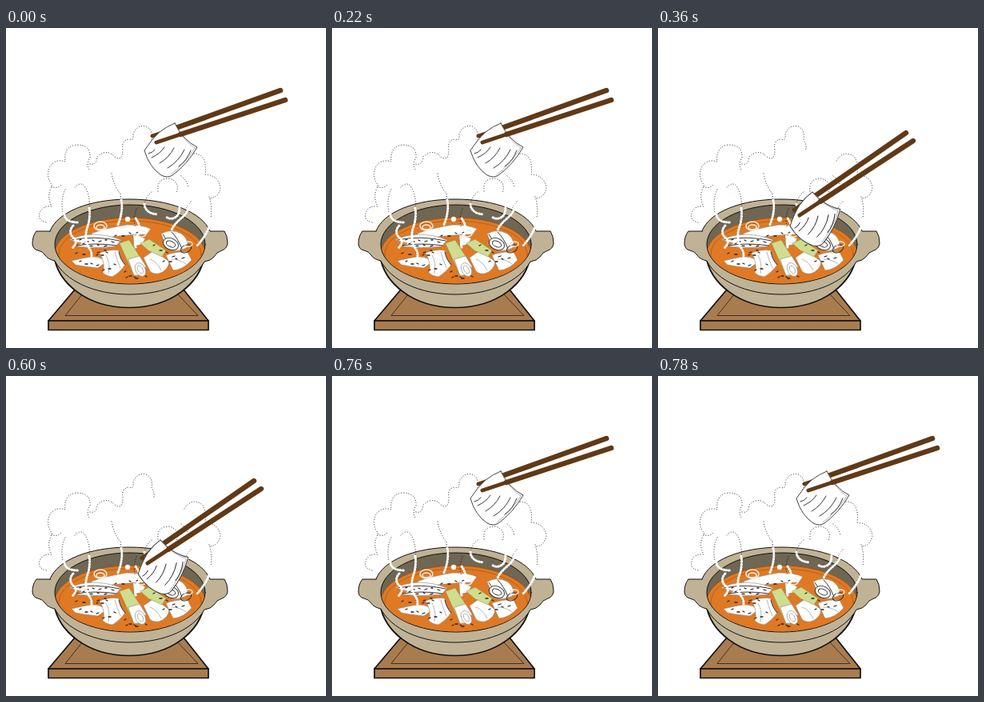
These frames come from a looping animation (400x400 px, 800 ms). An HTML page:

```html
<!DOCTYPE html>
<html lang="en">
<head>
<meta charset="utf-8">
<title>Hot pot</title>
<style>
html, body { margin: 0; width: 100%; height: 100%; overflow: hidden; background: #fff; }
svg { display: block; width: 100vw; height: 100vh; }
path, ellipse, circle { stroke-linecap: round; stroke-linejoin: round; }
.ink { stroke: #111; stroke-width: 1; }
.bold { stroke-width: 1.7; }
.line { fill: none; stroke: #222; stroke-width: .9; }
.soft { fill: none; stroke: #999; stroke-width: .7; }
.food { fill: #fff; stroke: #8d857b; stroke-width: .6; }
.leek { fill: #d0dc8e; stroke: #8f9c60; stroke-width: .6; }
.ring { fill: none; stroke: #f7eee2; stroke-width: 1.5; }
.dots { fill: none; stroke: #000; stroke-width: 1; stroke-dasharray: .1 3; }
.wisp { fill: none; stroke: #fff; stroke-width: 3; stroke-dasharray: .8 2.6; }
.stick { fill: none; stroke: #613916; }
</style>
</head>
<body>
<svg viewBox="0 0 400 400">
  <!-- stand -->
  <g class="ink" fill="#a97c50">
    <path class="bold" d="M86 327H222L253 366H53Z"/>
    <path fill="none" stroke-width=".7" d="M96 332L74 359.500H240L214 332"/>
    <path class="bold" d="M53 366H253V377.500H53Z"/>
  </g>

  <!-- pot: body, then rim and handles in one outline -->
  <g class="ink" fill="#c0b295">
    <path class="bold" d="M60 285C65 318 100 349.500 154 349.500S243 318 248 285Z"/>
    <path d="M55 254H38Q33 260 33 270Q34 277 40 278Q46 279 49 284Q52 289 61 291
      C74 316 110 333 154 333S234 317 248 292Q256 291 260 286Q263 280 270 278Q276 276 277 269Q277 260 273 254H255
      C245 230 204 214 154 214S64 230 55 254Z"/>
    <ellipse cx="155" cy="270.500" rx="94" ry="49.500" fill="#6f6654"/>
  </g>
  <clipPath id="bowl"><ellipse cx="155" cy="270.500" rx="93.500" ry="49"/></clipPath>
  <g clip-path="url(#bowl)">
    <ellipse cx="155" cy="282" rx="94" ry="45" fill="#df7924" stroke="#8d4d1c" stroke-width=".8"/>
    <ellipse cx="155" cy="283" rx="89" ry="42" fill="none" stroke="#ad5a18" stroke-width=".8"/>
  </g>

  <!-- ingredients -->
  <g class="food">
    <path d="M106 257Q125 250 151 246Q171 246 181 251L176 258Q150 258 119 263Z"/>
    <path d="M79 265Q90 259 108 258Q127 258 144 265L137 273Q113 276 88 273L94 269Z"/>
    <path d="M82 291L95 288Q112 284 119 288L126 292L115 300L98 298L87 296Z"/>
    <path d="M117 281Q129 276 141 278Q143 289 149 296Q142 306 133 311Q125 310 121 306Q125 295 117 281Z"/>
    <path d="M159 258L174 263L171 270L160 273Z"/>
    <path d="M172 287L185 278L204 292Q203 303 191 307Q181 308 179 302Z"/>
    <path d="M194 257Q207 250 219 257Q228 263 227 274Q215 281 202 277Z"/>
    <path d="M200 284Q213 279 227 280L232 290Q222 302 209 303Z"/>
  </g>
  <g class="leek">
    <path d="M142 269L154 265L175 298Q170 311 160 309Z"/>
    <path d="M168 269L179 264L200 278L195 286L178 278Z"/>
    <path class="food" d="M153 289L167 285L175 298Q170 311 160 309Z"/>
    <ellipse class="food" cx="168" cy="302" rx="6" ry="9" transform="rotate(-28 168 302)"/>
    <ellipse class="soft" cx="168" cy="302" rx="3" ry="5.500" transform="rotate(-28 168 302)"/>
  </g>
  <path class="soft" d="M125 284Q131 294 128 307M136 280Q139 291 143 300M207 289Q218 289 225 295M180 289Q188 291 194 303"/>
  <path class="line" d="M82 265Q111 259 142 266M88 272Q112 268 138 272M196 258Q204 268 203 277M207 255Q215 263 220 276M141 280Q143 290 149 296"/>
  <g class="line">
    <ellipse cx="206" cy="270" rx="10" ry="7" fill="#fff" transform="rotate(24 206 270)"/>
    <ellipse cx="206" cy="270" rx="6" ry="3.500" transform="rotate(24 206 270)"/>
    <ellipse cx="225" cy="276" rx="7" ry="4.500" transform="rotate(-25 225 276)"/>
  </g>
  <g class="ring">
    <ellipse cx="118" cy="247.500" rx="8" ry="5.500"/>
    <ellipse cx="118" cy="249" rx="5" ry="3"/>
    <circle cx="152" cy="239" r="2.500" fill="#fff"/>
    <ellipse cx="169" cy="257" rx="6" ry="4"/>
    <ellipse cx="228" cy="270" rx="5" ry="3"/>
  </g>
  <path id="specks" class="line" style="stroke-width:1.3"/>

  <!-- steam -->
  <path class="dots" d="M50 243Q38 240 43 229Q47 222 57 223Q50 209 58 197Q49 186 55 173Q62 163 74 167Q72 148 88 146Q106 146 105 162Q100 170 104 177
    M105 170Q113 172 114 161Q126 150 136 161Q146 168 146 151Q144 140 154 139Q160 142 159 132Q165 120 175 123Q184 127 182 140Q187 147 184 154
    M223 166Q231 153 243 159Q251 165 249 183Q265 184 268 199Q266 213 253 213
    M190 204Q188 188 204 188Q218 192 213 206M219 185Q226 190 228 199
    M57 198Q64 202 70 195M86 199Q94 191 99 199Q106 211 104 230M132 182Q135 198 143 207L144 226M182 205Q174 212 173 220M231 217Q224 225 224 231M254 211Q258 222 256 238M74 202Q68 214 71 231M163 226Q158 240 162 250"/>
  <path class="wisp" d="M73 233Q74 243 90 243M104 225Q106 238 101 251Q98 263 103 274Q109 281 106 289M144 215Q147 230 139 248M173 220Q174 232 190 233M216 218Q219 233 211 237Q205 240 200 236M229 221Q228 230 220 237Q207 248 207 254M256 238Q255 254 239 272M162 238Q170 249 165 259Q160 265 162 274M84 247Q77 255 84 262Q91 267 83 275"/>

  <!-- origin at the front chopstick's tip -->
  <g id="bite">
    <path class="stick" stroke-width="5" d="M-5 -8L60 -30"/>
    <path class="stick" stroke-width="6.500" d="M20 -16.500L155 -65"/>
    <path fill="#fff" stroke="#444" d="M23 -24Q33 -3 51 6Q38 28 20 41Q14 45 6 41Q-9 31 -15 10Q-6 -4 4 -13Q13 -20 23 -24Z"/>
    <path class="soft" d="M24 -21Q34 -2 48 7Q36 27 18 40"/>
    <path class="line" d="M10 6Q5 14 -6 19M22 7Q16 19 4 26M35 9Q28 24 14 32M43 10Q38 23 28 30M-2 9Q-5 13 -10 14"/>
    <path class="stick" stroke-width="5" d="M0 0L60 -20"/>
    <path class="stick" stroke-width="6.500" d="M30 -10L161 -53"/>
  </g>
</svg>
<script>
const byId = id => document.getElementById(id);

// Short seasoning flecks scattered along rows: [x, y, step x, step y, count]
const rows = [[92, 265, 8, 0, 6], [96, 270, 9, .3, 4], [87, 282, 9, -1, 5], [92, 292, 7, 1, 4],
  [113, 284, 6, -2, 3], [136, 260, 9, -2, 4], [148, 305, 6, 3, 3], [150, 312, 12, -1, 3],
  [184, 272, 8, 4, 4], [196, 292, 8, -2, 4], [121, 303, 7, -4, 3]];
byId("specks").setAttribute("d", rows.map(([x, y, dx, dy, n]) =>
  Array.from({ length: n }, (_, i) =>
    `M${x + i * dx} ${y + i * dy + i % 2 * 2}l${2 + i % 2} ${i % 3 - 1}`).join("")).join(""));

const bite = byId("bite");
function draw() {
  const t = performance.now() % 800;
  const dipped = t >= 360 && t < 760;
  bite.setAttribute("transform", dipped ? "translate(177 234) rotate(-15)" : "translate(188 143)");
  requestAnimationFrame(draw);
}
draw();
</script>
</body>
</html>
```
